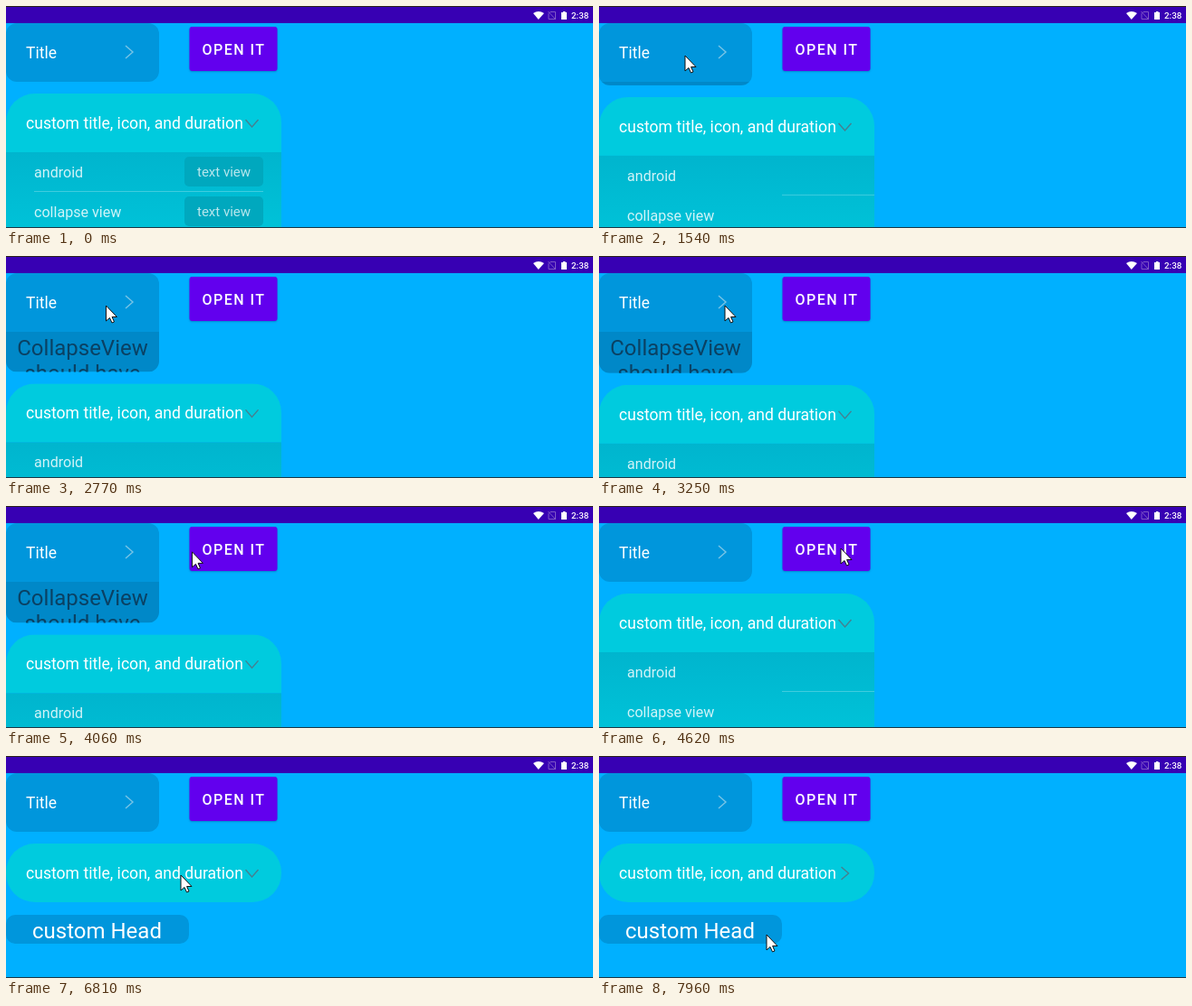
Recreate the animation shown at these times as an HTML page with a canvas. Size 648 by 246 pixels, loop 7990 ms.

```html
<!DOCTYPE html>
<html lang="en">
<head>
<meta charset="utf-8">
<title>Collapsible cards</title>
<style>
html, body { margin: 0; width: 100%; height: 100%; overflow: hidden; background: #00b0ff; }
canvas { display: block; }
</style>
</head>
<body>
<canvas id="stage" width="648" height="246"></canvas>
<script>
const ctx = document.getElementById('stage').getContext('2d');
const LOOP = 7990;
const TOGGLE = 260;

// Each click opens or closes the first card in turn.
const clicks = [900, 1330, 1680, 2100, 2480, 2740, 3000, 3290, 3820, 4340, 4880, 5600];

// The pointer leaves at one time and glides to a place, arriving at another.
const moves = [
  { from: 40, to: 850, x: 109, y: 73 },
  { from: 870, to: 1250, x: 95, y: 55 },
  { from: 2480, to: 3200, x: 139, y: 55 },
  { from: 3810, to: 4300, x: 267, y: 47 },
  { from: 4900, to: 5570, x: 231, y: 58 },
  { from: 5600, to: 6470, x: 193, y: 132 },
  { from: 7050, to: 7500, x: 438, y: 31 },
  { from: 7500, to: 7960, x: 185, y: 198 }
];

const clamp = p => Math.min(1, Math.max(0, p));
const ease = p => (1 - Math.cos(Math.PI * clamp(p))) / 2;
const progress = (t, from, to) => ease((t - from) / (to - from));

const openAmount = t => clicks.reduce(
  (sum, at, i) => sum + (i % 2 ? -1 : 1) * progress(t, at, at + TOGGLE), 0);

function pointerAt(t) {
  let x = 476, y = 230;
  for (const move of moves) {
    const p = progress(t, move.from, move.to);
    x += (move.x - x) * p;
    y += (move.y - y) * p;
  }
  return [x, y];
}

function rect(x, y, w, h, fill) {
  ctx.fillStyle = fill;
  ctx.fillRect(x, y, w, h);
}

function round(x, y, w, h, r, fill) {
  ctx.beginPath();
  ctx.roundRect(x, y, w, h, r);
  ctx.fillStyle = fill;
  ctx.fill();
}

function text(str, x, y, size, fill = '#fff', { weight = 400, align = 'left', spacing = 0 } = {}) {
  ctx.font = `${weight} ${size}px Roboto, sans-serif`;
  ctx.letterSpacing = spacing + 'px';
  ctx.textAlign = align;
  ctx.fillStyle = fill;
  ctx.fillText(str, x, y);
}

function clipped(x, y, w, h, r, draw) {
  ctx.save();
  ctx.beginPath();
  ctx.roundRect(x, y, w, h, r);
  ctx.clip();
  draw();
  ctx.restore();
}

function chevron(x, y, turn, color) {
  ctx.save();
  ctx.translate(x, y);
  ctx.rotate(turn * Math.PI / 2);
  ctx.strokeStyle = color;
  ctx.lineWidth = 1.4;
  ctx.stroke(new Path2D('M-4-7L4 0L-4 7'));
  ctx.restore();
}

function statusBar() {
  rect(0, 0, 648, 19, '#3700b3');
  rect(0, 0, 648, 1, '#2b2418');
  ctx.fillStyle = '#fff';
  ctx.fill(new Path2D('M582 8Q587.8 4 594 8L587.8 15Z'));
  ctx.fill(new Path2D('M613 7H615V6H617.5V7H619V15H613Z'));
  ctx.strokeStyle = '#7d58c6';
  ctx.lineWidth = 1;
  ctx.stroke(new Path2D('M601 6.5H606.5V14.5H599V8.5ZM598.5 6L607 15'));
  text('2:38', 624, 14, 9.8, '#fff', { weight: 500 });
}

function firstCard(extra) {
  clipped(0, 19, 169, 65 + extra, 12, () => {
    rect(0, 19, 169, 65, '#0096dc');
    rect(0, 84, 169, extra, '#0088c8');
    if (extra > 0) {
      text('CollapseView', 84.5, 110, 24, '#0a4163', { align: 'center' });
      text('should have', 84.5, 138, 24, '#0a4163', { align: 'center' });
    }
  });
  text('Title', 22, 58, 17.5);
  chevron(136, 51, 0, '#78c4e6');
}

function button(t) {
  const press = clamp(1 - Math.abs(t - 5570) / 130);
  ctx.save();
  ctx.shadowColor = 'rgba(0,40,90,.3)';
  ctx.shadowBlur = 2;
  ctx.shadowOffsetY = 1;
  round(202.5, 23, 97, 49, 3, '#6200ee');
  ctx.restore();
  round(202.5, 23, 97, 49, 3, `rgba(255,255,255,${0.05 * press})`);
  text('OPEN IT', 216.6, 54, 16, '#fff', { weight: 500, spacing: 1.43 });
}

function listCard(top, height, turn, buttons) {
  const body = top + 65;
  clipped(0, top, 304, 65 + height, 32, () => {
    rect(0, top, 304, 65, '#00cbde');
    const shade = ctx.createLinearGradient(0, body, 0, body + 84);
    shade.addColorStop(0, '#00b5ce');
    shade.addColorStop(1, '#00c2d8');
    rect(0, body, 304, height, shade);
    ['android', 'collapse view'].forEach((label, i) => {
      const y = body + 44 * i;
      text(label, 31, y + 28, 16.1, 'rgba(255,255,255,.82)');
      if (buttons) {
        round(197, y + 5, 87, 33, 5, '#00a8be');
        text('text view', 211, y + 27, 15, 'rgba(255,255,255,.72)');
      }
    });
    const left = buttons ? 31 : 202;
    rect(left, body + 43, (buttons ? 284 : 304) - left, 1, 'rgba(255,255,255,.25)');
  });
  text('custom title, icon, and duration', 22, top + 39, 17.6);
  chevron(271.5, top + 33, turn, '#467f90');
}

function pointer(t) {
  if (t < 40) return;
  const arrow = new Path2D('M0 0V17L4 13.5L6.5 19L9 18L6.6 12.5H12Z');
  ctx.save();
  ctx.translate(...pointerAt(t));
  ctx.fillStyle = '#fff';
  ctx.fill(arrow);
  ctx.strokeStyle = '#111';
  ctx.lineWidth = 1;
  ctx.stroke(arrow);
  ctx.restore();
}

function frame() {
  const t = performance.now() % LOOP;
  const extra = 46 * openAmount(t);
  const height = 200 * (1 - progress(t, 6570, 6800));
  const top = 97 + extra;
  const head = top + height + 79;
  rect(0, 0, 648, 246, '#00b0ff');
  statusBar();
  firstCard(extra);
  button(t);
  listCard(top, height, 1 - progress(t, 7050, 7300), t < clicks[0]);
  round(0, head, 202, 32, 10, '#0096dc');
  text('custom Head', 29, head + 26, 24);
  rect(0, 245, 648, 1, '#1c3544');
  pointer(t);
  requestAnimationFrame(frame);
}
frame();
</script>
</body>
</html>
```
